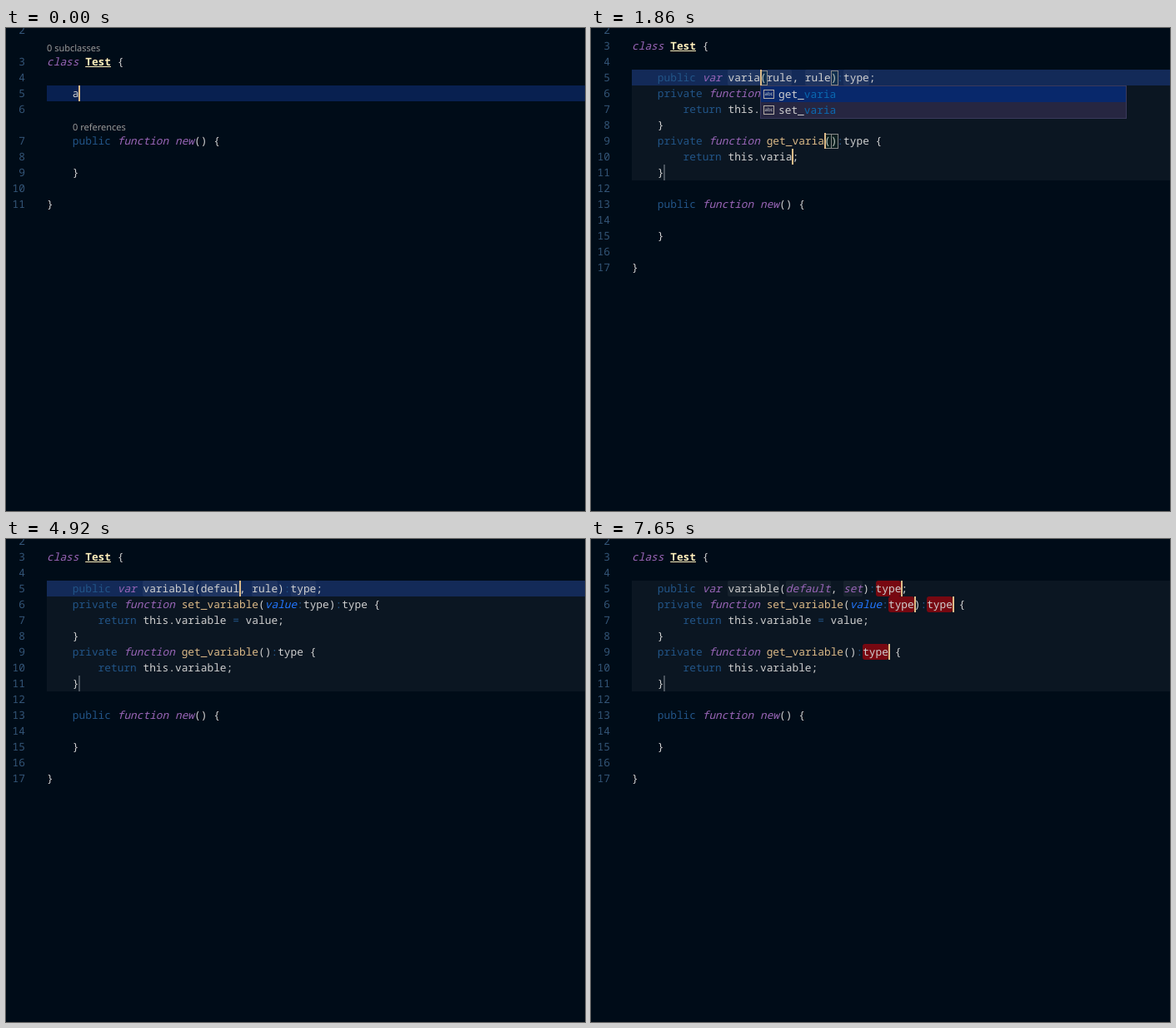
Write an HTML page that moves like this. It is 695 by 580 pixels and loops after 8 s.

```html
<!DOCTYPE html>
<html lang="en">
<head>
<meta charset="utf-8">
<title>Snippet editor</title>
<style>
  html, body { margin: 0; width: 100%; height: 100%; overflow: hidden; background: #000c18; }
  #editor {
    position: relative; width: 695px; height: 580px; overflow: hidden; color: #d0d0d0;
    font: 12.83px/19px "Noto Sans Mono", monospace;
    text-rendering: geometricPrecision; font-variant-ligatures: none;
  }
  #editor div { position: absolute; white-space: pre; height: 19px; box-sizing: border-box; }
  #editor .num { left: 0; width: 23px; text-align: right; color: #335577; }
  #editor .lens { font: 11px/25px "Noto Sans", sans-serif; color: #999; }
  #editor .active { left: 49px; right: 0; background: #082050; }
  #editor .block { left: 49px; right: 0; background: rgba(255, 255, 255, .045); }
  #editor .tint { background: rgba(255, 255, 255, .05); border-radius: 2px; }
  #editor .sel { background: #770811; border-radius: 3px; }
  #editor .caret { width: 2px; background: #ddbb88; }
  #editor .end { width: 2px; background: #4b545e; }
  #editor .pair { width: 9px; height: 18px; margin-top: 1px; border: 1px solid #888; background: rgba(0, 100, 0, .1); }
  #editor .popup { width: 440px; background: #262641; border: 1px solid #3a3a5c; }
  #editor .row { left: 0; width: 438px; padding-left: 21px; }
  #editor .row:first-child { background: #08286b; }
  #editor .row b { font-weight: 400; color: #0a69b2; }
  #editor .row i {
    position: absolute; left: 3px; top: 4px; width: 11px; height: 9px; border: 1px solid #b5aea6;
    font: 6px/8px "Noto Sans", sans-serif; text-align: center; color: #d0d0d0;
  }
  .key { color: #225588; }
  .store { color: #9966b8; font-style: italic; }
  .func { color: #ddbb88; }
  .param { color: #2277ff; font-style: italic; }
  .type { color: #ffeebb; font-weight: 700; text-decoration: underline; }
</style>
</head>
<body>
<div id="editor"></div>
<script>
const LEFT = 49, CHAR = 7.698, ROW = 19, LOOP = 8000;
const placeholders = ["name", "rule", "rule", "type"];
const finals = ["variable", "default", "set", "type"];
const snippet = [
  "    public var {0}({1}, {2}):{3};",
  "    private function set_{0}(value:{3}):{3} {",
  "        return this.{0} = value;",
  "    }",
  "    private function get_{0}():{3} {",
  "        return this.{0};",
  "    }"
];
const before = ["", "class Test {", ""];
const after = ["", "    public function new() {", "", "    }", "", "}"];
const setWords = ["set", "set_variable", "setter", "self"];

// time, tab stop (-1: snippet prefix), typed text (null: placeholder selected), options
const steps = [
  [0, -1, "a", { lens: 1 }], [110, -1, "ac", { lens: 1 }],
  [220, -1, "acc", { lens: 1 }], [330, -1, "acce", { lens: 1 }],
  [440, 0, null, { lens: 1 }], [660, 0, null], [880, 0, null, { blink: 1 }],
  [1420, 0, "v"], [1640, 0, "va"],
  ...["vari", "varia", "variab", "variabl"].map((w, i) =>
    [[1750, 1860, 2080, 2190][i], 0, w, { words: ["get_" + w, "set_" + w] }]),
  [2300, 0, "variable"],
  [2530, 1, null],
  [3840, 1, "d"], [4060, 1, "de"], [4170, 1, "def"], [4280, 1, "defa"], [4390, 1, "defau"],
  [4490, 1, "defaut"], [4710, 1, "defau"], [4920, 1, "defaul"], [5030, 1, "default"],
  [5140, 2, null],
  [5690, 2, "s", { plain: 1 }], [5800, 2, "s"],
  [5900, 2, "se", { words: setWords }], [6010, 2, "set", { words: setWords.slice(0, 3) }],
  [6340, 2, "set"],
  [6670, 3, null], [7110, 3, null, { blink: 1 }], [7650, 3, null]
];

const editor = document.getElementById("editor");
const colX = col => Math.round(LEFT + col * CHAR);
const box = (cls, y, x, text = "", width) =>
  `<div class="${cls}" style="top:${y}px;${x == null ? "" : `left:${x}px;`}${width ? `width:${width}px` : ""}">${text}</div>`;

const syntax = /(\b(?:public|private|return)\b|[:=])|(\b(?:class|var|function|new|default|set)\b)|([gs]et_\w+)|((?<=\()value)|(Test)/g;
const classes = ["key", "store", "func", "param", "type"];
const paint = line => line.replace(syntax, (word, ...groups) =>
  `<span class="${classes[groups.findIndex(g => g)]}">${word}</span>`);

// Fills the tab stops of a line and notes where each one lands.
function fill(line, values) {
  const spots = [];
  let shift = 0;
  const text = line.replace(/\{(\d)\}/g, (mark, i, at) => {
    spots.push({ stop: +i, col: at + shift, len: values[i].length });
    shift += values[i].length - mark.length;
    return values[i];
  });
  return { text, spots };
}

function popup(words, typed, x, y) {
  const rows = words.map((w, i) =>
    box("row", i * ROW, 0, "<i>abc</i>" + w.replace(typed, "<b>$&</b>"))).join("");
  return `<div class="popup" style="left:${x}px;top:${y}px;height:${words.length * ROW + 2}px">${rows}</div>`;
}

function pairs(text, col, y) {
  const other = text[col] === "(" ? text.indexOf(")", col)
    : text[col] === ")" ? text.lastIndexOf("(", col) : -1;
  return other < 0 ? "" : box("pair", y, colX(col)) + box("pair", y, colX(other));
}

function draw([, stop, typed, opt = {}]) {
  const values = placeholders.map((p, i) => i < stop ? finals[i] : i === stop ? typed ?? p : p);
  const open = stop >= 0;
  const lines = [...before, ...(open ? snippet : ["    " + typed]), ...after];
  let under = "", text = "", over = "", y = -7 - ROW;

  lines.forEach((raw, i) => {
    const line = fill(raw, values);
    y += ROW;
    const lens = /class/.test(raw) ? "0 subclasses" : /new/.test(raw) ? "0 references" : "";
    if (opt.lens && lens) {
      text += box("lens", y, colX(raw.search(/\S/)), lens);
      y += ROW;
    }
    text += box("num", y, null, i + 2) + box("code", y, LEFT, paint(line.text));
    if (i === 3 && typed) under += box("active", y);
    if (!open && i === 3) over += box("caret", y, colX(line.text.length));
    if (!open || i < 3 || i > 9) return;

    under += box("block", y);
    if (i === 9) over += box("end", y, colX(5));
    for (const { stop: s, col, len } of line.spots) {
      const x = colX(col), end = colX(col + len), on = s === stop;
      if (on && !typed) under += box("sel", y, x, "", end - x);
      else if (i === 3) under += box("tint", y, x, "", end - x);
      if (!on) continue;
      if (typed && !opt.plain) over += pairs(line.text, col + len, y);
      if (!opt.blink) over += box("caret", y, end);
      if (i === 3 && opt.words) opt.popup = popup(opt.words, typed, end, y + ROW);
    }
  });
  editor.innerHTML = under + text + over + (opt.popup || "");
}

let shown;
function tick(now) {
  const t = now % LOOP;
  const step = steps.findLast(s => s[0] <= t);
  if (step !== shown) draw(shown = step);
  requestAnimationFrame(tick);
}
tick(performance.now());
</script>
</body>
</html>
```
